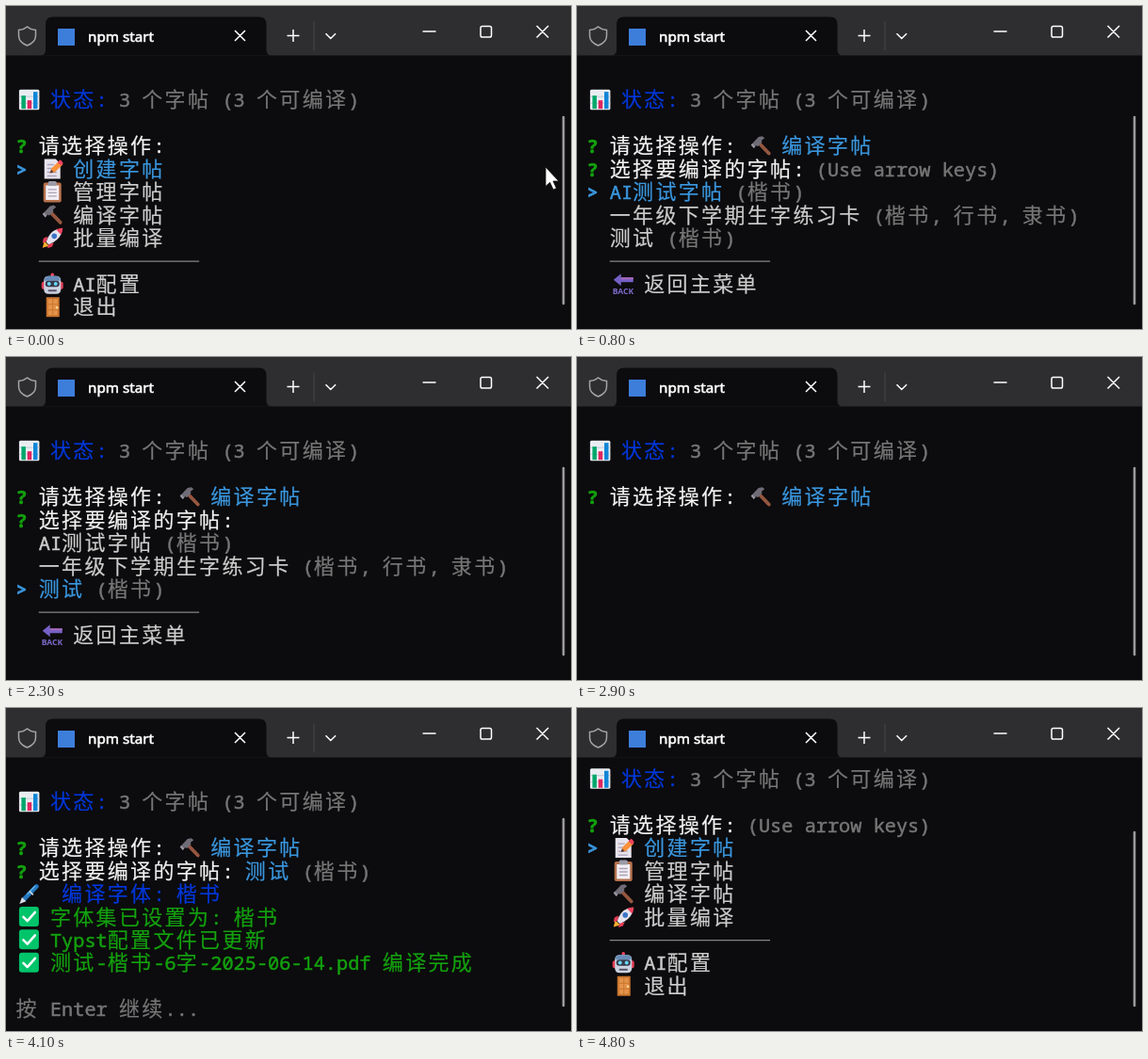
These frames come from a looping animation (600 by 343 pixels, 7900 ms). An HTML page:

```html
<!DOCTYPE html>
<html lang="zh-CN">
<head>
<meta charset="utf-8">
<title>Terminal</title>
<style>
  html, body { margin: 0; width: 100%; height: 100%; overflow: hidden; background: #0c0b0d; }
  svg { display: block; }
  .cjk { font-family: "Noto Sans CJK SC", "Noto Sans CJK", sans-serif; font-size: 22px; letter-spacing: 2.34px; stroke-width: .2px; }
  .mono { font-family: "Noto Sans Mono", monospace; font-size: 20.28px; stroke-width: .5px; }
  .mark { font-weight: 700; }
  .title { font-family: "Noto Sans", "Open Sans", sans-serif; font-size: 15.2px; fill: #fff; stroke: #fff; stroke-width: .6px; }
  .back { font: 700 8.6px "Open Sans", sans-serif; fill: #7d6ac9; }
  .line { fill: none; stroke: #fff; stroke-width: 1.5; }
</style>
</head>
<body>
<svg width="600" height="343" viewBox="0 0 600 343">
  <defs>
    <g id="chart">
      <rect x="1.5" y="1.5" width="21.500" height="21.500" rx="1.5" fill="#e9edf2"/>
      <path d="M1.5 9H23M1.5 16H23" stroke="#c3cbd5"/>
      <path d="M4 8h4.500v14H4z" fill="#00a86b"/>
      <path d="M10.300 13h4.500v9h-4.500z" fill="#e0245e"/>
      <path d="M16.600 4h4.500v18h-4.500z" fill="#0f86d8"/>
    </g>
    <g id="memo">
      <path d="M4 2h12l5 5v16H4z" fill="#e8e4ee"/>
      <path d="M7 8h7M7 12h6M7 16h10M7 20h10" stroke="#aaa1b8" stroke-width="1.300"/>
      <path d="M10 17l1.500-5 8-8 4 4-8.500 8z" fill="#f9913a"/>
      <path d="M18 5.500l2.500-2.500q2 0 3.500 3.800L21.500 9z" fill="#f0435f"/>
      <path d="M10 17l1.200-3.800 2.600 2.700z" fill="#4b3b40"/>
    </g>
    <g id="clip">
      <rect x="3" y="2.500" width="19" height="21" rx="2" fill="#b5714c"/>
      <path d="M5.500 5.500h14v15.500h-14z" fill="#f2eef5"/>
      <rect x="8" y="1" width="9" height="5" rx="1.500" fill="#9b9ba8"/>
      <path d="M8 10h9M8 13.500h9M8 17h9" stroke="#aaa3b5" stroke-width="1.300"/>
    </g>
    <g id="hammer">
      <path d="M9 8L21 20.500" stroke="#95573f" stroke-width="3.800" stroke-linecap="round"/>
      <path d="M2 11.500L10 3l4-.8 2.500 2L13 7l.8 1.500-4.600 4.600L7.500 12 5 15z" fill="#6f6c77"/>
      <path d="M2 11.500l1.500-1.600 3 3.200L5 15z" fill="#98939f"/>
    </g>
    <g id="rocket">
      <path d="M2 23l2-7 5 5z" fill="#ffb02e"/>
      <path d="M7 11L3 13l-1 5 5-2zM14 18l-2 4-5 1.500 2-5z" fill="#e33d55"/>
      <path d="M6 17Q9 6 18 3l4.500 4Q19 16 8.500 19.500z" fill="#e5e2ed"/>
      <path d="M16.500 3.600Q20 1.800 23.500 2q.2 3.500-1.800 7z" fill="#f0435f"/>
      <circle cx="14.500" cy="10.500" r="2.800" fill="#3c75c8"/>
    </g>
    <g id="robot">
      <path d="M12.500 5V2" stroke="#b9b5c5" stroke-width="2"/>
      <circle cx="12.500" cy="2.500" r="1.800" fill="#f0435f"/>
      <rect x="1" y="10" width="23" height="8" rx="2" fill="#e33d55"/>
      <path d="M3.500 9q0-5 5-5h8q5 0 5 5v9q0 5-5 5h-8q-5 0-5-5z" fill="#cbd2e0"/>
      <path d="M4 9q0-5 5-5h7q5 0 5 5z" fill="#678cb8"/>
      <rect x="5" y="9" width="15" height="6.500" rx="3" fill="#35384a"/>
      <circle cx="9" cy="12.200" r="2" fill="#67d6f5"/><circle cx="16" cy="12.200" r="2" fill="#67d6f5"/>
      <path d="M8 18.500h9v2H8z" fill="#5b5368"/>
    </g>
    <g id="door">
      <path d="M6 2h14v21H6z" fill="#c9752f"/>
      <path d="M8 4h10v17H8z" fill="#e5934a"/>
      <path d="M13 4v17M8 9.500h10M8 15.500h10" stroke="#c9752f"/>
      <circle cx="17.500" cy="13" r="1.200" fill="#ffe09a"/>
    </g>
    <g id="back">
      <path d="M2 8l8-6.500V5.500h13v5H10v4z" fill="#7560c6"/>
      <path d="M10 5.500h13v2H10z" fill="#a868b8"/>
      <text class="back" x="1" y="23">BACK</text>
    </g>
    <g id="pen">
      <path d="M7 18L20 4.500" stroke="#2577be" stroke-width="4.800" stroke-linecap="round"/>
      <path d="M10 13L18.500 4" stroke="#62b5e6" stroke-width="1.400"/>
      <path d="M2 23l2.500-7 4.500 4.300z" fill="#d9dce5"/>
      <path d="M12.500 9.500l4 4" stroke="#d9dce5" stroke-width="1.500"/>
    </g>
    <g id="check">
      <rect x="1.500" y="1.500" width="21" height="21" rx="3" fill="#00c46a"/>
      <path d="M6 12.500l4.300 4.300L18.500 7.500" fill="none" stroke="#fff" stroke-width="2.500" stroke-linecap="round" stroke-linejoin="round"/>
    </g>
  </defs>

  <rect width="600" height="343" fill="#0c0b0d"/>
  <rect width="600" height="52.500" fill="#2e2d2f"/>
  <path d="M36 52.500q6 0 6-6V19.500q0-8 8-8H268.500q8 0 8 8V46.500q0 6 6 6z" fill="#0c0b0d"/>
  <rect x="55" y="24" width="18" height="18" fill="#3d7edb"/>
  <text class="title" x="87" y="38">npm start</text>
  <g transform="translate(-.5 -.5)">
    <path class="line" style="stroke:#a5a5a5" d="M23 22.500q4 3.300 9 3.500v6q0 7-9 10.500-9-3.500-9-10.500v-6q5-.2 9-3.500z"/>
    <path class="line" d="M243.500 26.500l11 11m0-11l-11 11M299 32h13M305.500 25.500v13M340 29.700l5.300 5.300 5.300-5.300M443 27.500h14M564 21.500l12.500 12.500m0-12.500L564 34"/>
    <rect class="line" x="504.500" y="22" width="11.500" height="11.500" rx="1.800"/>
    <path d="M327.500 17v31" stroke="#474648"/>
  </g>
  <g id="screen"></g>
</svg>
<script>
const LOOP = 7900, CELL = 12.17, LEFT = 10.4, TOP = 75.5, ROW = 24.45;
const WHITE = '#f2f2f2', TEXT = '#cccccc', GREY = '#767676', BLUE = '#0037da', CYAN = '#3a96dd', GREEN = '#13a10e';
const colX = col => LEFT + col * CELL;
const rowY = row => TOP + row * ROW;

// Lays text on the cell grid: CJK glyphs take two columns, others one.
function put(row, col, text, color, style = '') {
  let out = '';
  for (const [run] of text.matchAll(/[\u4e00-\u9fff]+|[!-~]+| +/g)) {
    const wide = run > '\u4e00';
    if (run[0] !== ' ') {
      const safe = run.replace('>', '&gt;');
      out += `<text class="${wide ? 'cjk' : 'mono'} ${style}" x="${colX(col)}" y="${rowY(row) + 7.3}" fill="${color}" stroke="${color}">${safe}</text>`;
    }
    col += run.length * (wide ? 2 : 1);
  }
  return out;
}
const icon = (name, row, col) => `<use href="#${name}" x="${colX(col) + 2}" y="${rowY(row) - 12.8}"/>`;
const rule = row => `<path d="M${colX(2)} ${rowY(row)}H${colX(16)}" stroke="#858585" stroke-width="1.3"/>`;
const status = row => icon('chart', row, 0) + put(row, 3, '状态:', BLUE) + put(row, 9, '3 个字帖 (3 个可编译)', GREY);
const ask = (row, text) => put(row, 0, '?', GREEN, 'mark') + put(row, 2, text, WHITE);
const arrow = row => put(row, 0, '>', CYAN, 'mark');
const hint = (row, col) => put(row, col, '(Use arrow keys)', GREY);
const bar = top => `<path d="M592 ${top + 1}V316" stroke="#9c9a9b" stroke-width="2.6" stroke-linecap="round"/>`;
const pointer = '<path d="M573 171v20.500l4.600-4.200 3.600 7.700 3.300-1.500-3.500-7.500h6z" fill="#fff" stroke="#111" stroke-width=".8"/>';
const cursor = `<rect x="${colX(17) - 0.4}" y="307" width="1.3" height="24.5" fill="#f2f2f2"/>`;

const ACTIONS = [['memo', '创建字帖'], ['clip', '管理字帖'], ['hammer', '编译字帖'], ['rocket', '批量编译']];
function menu(top, picked) {
  const items = ACTIONS.map(([name, label], i) => icon(name, top + 1 + i, 2) +
    put(top + 1 + i, 5, label, i === picked ? CYAN : TEXT)).join('');
  return status(top - 2) + ask(top, '请选择操作:') + arrow(top + 1 + picked) + items + rule(top + 5) +
    icon('robot', top + 6, 2) + put(top + 6, 5, 'AI配置', TEXT) +
    icon('door', top + 7, 2) + put(top + 7, 5, '退出', TEXT);
}

const chosen = bar(117) + status(1) + ask(3, '请选择操作:') + icon('hammer', 3, 14) + put(3, 17, '编译字帖', CYAN);
const question = ask(4, '选择要编译的字帖:');
const BOOKS = [['AI测试字帖', 13, '(楷书)'], ['一年级下学期生字练习卡', 25, '(楷书, 行书, 隶书)'], ['测试', 7, '(楷书)']];
function list(picked) {
  const items = BOOKS.map(([name, col, fonts], i) =>
    put(5 + i, 2, name, i === picked ? CYAN : TEXT) + put(5 + i, col, fonts, GREY)).join('');
  return chosen + question + arrow(5 + picked) + items + rule(8) +
    icon('back', 9, 2) + put(9, 5, '返回主菜单', TEXT);
}

const done = (row, text) => icon('check', row, 0) + put(row, 3, text, GREEN);
const started = chosen + question + put(4, 20, '测试', CYAN) + put(4, 25, '(楷书)', GREY) +
  icon('pen', 5, 0) + put(5, 4, '编译字体: 楷书', BLUE);
const configured = started + done(6, '字体集已设置为: 楷书') + done(7, 'Typst配置文件已更新');
const finished = configured + done(8, '测试-楷书-6字-2025-06-14.pdf 编译完成') + put(10, 0, '按 Enter 继续...', GREY);
const first = picked => bar(117) + menu(3, picked) + pointer;

const STEPS = [
  [0, first(0)],
  [300, first(1)],
  [400, first(2)],
  [700, chosen],
  [800, list(0) + hint(4, 20)],
  [2000, list(1)],
  [2300, list(2)],
  [2900, chosen],
  [3000, started],
  [3500, configured],
  [3700, finished + cursor],
  [4100, finished],
  [4600, finished + cursor],
  [4700, bar(131) + status(0)],
  [4800, bar(131) + menu(2, 0) + hint(2, 14)]
];

const screen = document.getElementById('screen');
let shown = null;
function draw() {
  const t = performance.now() % LOOP;
  const step = STEPS.findLast(([at]) => at <= t);
  if (step !== shown) {
    screen.innerHTML = step[1];
    shown = step;
  }
  requestAnimationFrame(draw);
}
draw();
</script>
</body>
</html>
```
